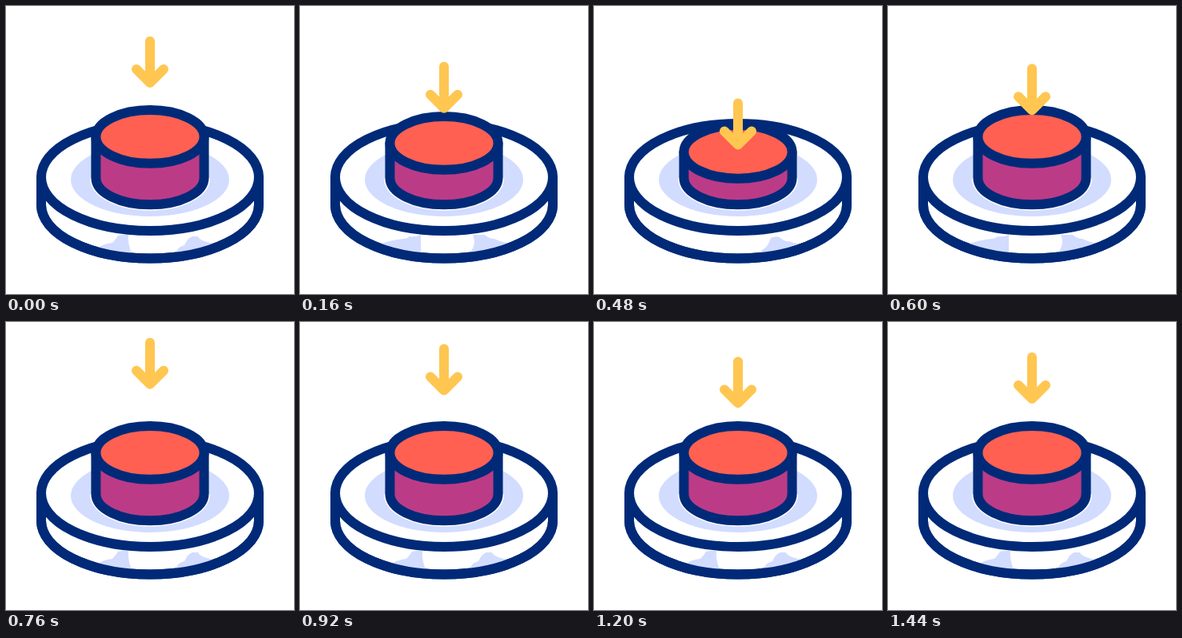
An HTML page that plays this animation: 360 px wide and 360 px high, repeating every 1480 ms.

```html
<!DOCTYPE html>
<html lang="en">
<head>
<meta charset="utf-8">
<title>Push button</title>
<style>
  html, body { margin: 0; width: 100%; height: 100%; overflow: hidden; background: #fff; }
  svg { display: block; width: 100vw; height: 100vh; }
  .line { stroke: #002a78; stroke-width: 12; stroke-linejoin: round; }
  .shade { fill: #d2dcff; }
  .halo { fill: none; stroke: #fff; stroke-width: 15; }
  .arrow { fill: none; stroke: #ffc651; stroke-width: 12; stroke-linecap: round; stroke-linejoin: round; }
</style>
</head>
<body>
<svg viewBox="0 0 360 360">
  <path class="line" fill="#fff" d="M44 214V248.5A136 67 0 0 0 316 248.5V214Z"/>
  <path id="left" class="shade"/>
  <path id="right" class="shade"/>
  <path class="line" fill="none" d="M44 248.5A136 67 0 0 0 316 248.5"/>
  <ellipse class="line" fill="#fff" cx="180" cy="214" rx="136" ry="67"/>
  <ellipse class="shade" cx="180" cy="217" rx="99" ry="46"/>
  <path class="halo" d="M112.4 215A67.6 33.3 0 0 0 247.6 215"/>
  <path id="side" class="line" fill="#bc3b87"/>
  <ellipse id="cap" class="line" fill="#ff6051" cx="180" rx="67.6" ry="33.4"/>
  <path id="arrow" class="arrow" d="M180 44V96M163 79L180 96L197 79"/>
</svg>
<script>
  const LOOP = 1480, STEP = 40;
  const $ = id => document.getElementById(id);

  // [time, downward offset]
  const arrowKeys = [[0, 0], [380, 84], [420, 84], [790, -20], [1110, 6.5], [1440, 0], [LOOP, 0]];
  const capKeys = [[0, 0], [40, 0], [380, 29], [400, 29], [600, 0], [LOOP, 0]];

  // Reflections on the rim: at rest, halfway, pressed
  const glints = [
    ['M112 304Q121 297 133 296Q137 292 140 287Q147 285 153 286Q152 295 156 307V312Q130 310 112 304Z',
     'M213 307Q215 301 223 299Q227 290 233 288H240Q242 294 260 297Q238 307 213 310Z'],
    ['M96 299Q115 292 129 291Q134 291 137 288Q144 289 151 286V312Q122 310 96 299Z',
     'M213 308Q221 297 216 286H231Q236 291 243 291Q253 296 261 296Q238 307 213 310Z'],
    ['',
     'M209 306Q218 301 221 290Q227 287 232 289Q238 295 244 294Q250 297 256 297Q236 307 209 310Z']
  ];

  function valueAt(keys, t) {
    const i = keys.findIndex(k => k[0] > t);
    const [t0, a] = keys[i - 1], [t1, b] = keys[i];
    const ease = (1 - Math.cos(Math.PI * (t - t0) / (t1 - t0))) / 2;
    return a + (b - a) * ease;
  }

  function draw(now) {
    const t = Math.floor(now % LOOP / STEP) * STEP;
    const drop = valueAt(arrowKeys, t);
    const y = 163.4 + valueAt(capKeys, t);
    const [left, right] = glints[drop > 60 ? 2 : drop > 20 ? 1 : 0];

    $('arrow').setAttribute('transform', `translate(0 ${drop})`);
    $('cap').setAttribute('cy', y);
    $('side').setAttribute('d', `M112.4 ${y}V215A67.6 33.3 0 0 0 247.6 215V${y}Z`);
    $('left').setAttribute('d', left);
    $('right').setAttribute('d', right);
  }

  let start;
  function tick(now) {
    start ??= now;
    draw(Math.max(0, now - start));
    requestAnimationFrame(tick);
  }
  draw(0);
  requestAnimationFrame(tick);
</script>
</body>
</html>
```
